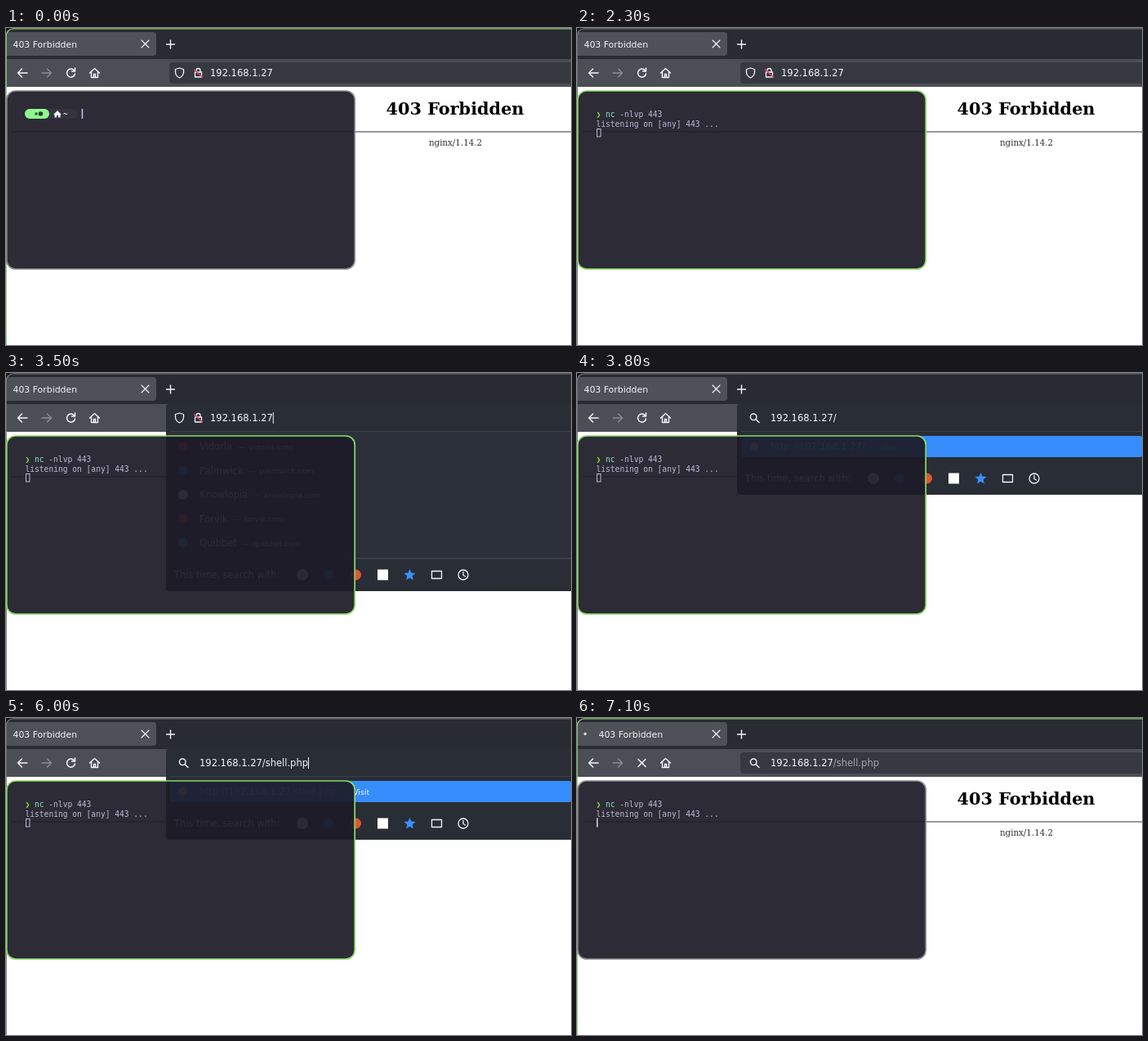
Recreate the animation shown at these times as an HTML page with a canvas. Size 692 px wide and 388 px high, loop 8000 ms.

```html
<!DOCTYPE html>
<html lang="en">
<head>
<meta charset="utf-8">
<title>Listener and browser</title>
<style>
  html, body { margin: 0; width: 100%; height: 100%; overflow: hidden; background: #fff; }
  canvas { display: block; }
</style>
</head>
<body>
<canvas id="stage" width="692" height="388"></canvas>
<script>
const ctx = document.getElementById('stage').getContext('2d');
const LOOP = 8000, TICK = 100;
const SANS = '"DejaVu Sans", sans-serif', SERIF = '"DejaVu Serif", serif', MONO = '"DejaVu Sans Mono", monospace';
const HOST = '192.168.1.27', PATH = '/shell.php', COMMAND = 'nc -nlvp 443', CHAR = 5.77;
const WHITE = '#f4f4f8', LAVENDER = '#c0b9d6', MINT = '#8fe6c4';

const ICON = {
  back: 'M6 0H-5.5M-.5-5L-5.5 0L-.5 5',
  forward: 'M-6 0H5.5M.5-5L5.5 0L.5 5',
  reload: 'M4-3A5 5 0 1 0 5 1M5-6V-2H1',
  cross: 'M-4.5-4.5L4.5 4.5M4.5-4.5L-4.5 4.5',
  home: 'M-6 0L0-5.5L6 0M-4-1.5V5.5H4V-1.5M-1 5V1.5H1V5',
  plus: 'M-5 0H5M0-5V5',
  shield: 'M0-6L5-4.5V-1C5 3 2 5 0 6C-2 5-5 3-5-1V-4.5Z',
  lock: 'M-4-1H4V5H-4ZM-2.5-1V-3A2.5 2.5 0 0 1 2.5-3V-1',
  slash: 'M-5-4L5 5',
  lens: 'M2.5-1.2A3.8 3.8 0 1 1-5.1-1.2A3.8 3.8 0 1 1 2.5-1.2M1.4 1.5L5.5 5.5',
  star: 'M0-7L2-2.4L7-2L3.2 1.4L4.4 6.4L0 3.7L-4.4 6.4L-3.2 1.4L-7-2L-2-2.4Z',
  tabs: 'M-6-4.5H6V4.5H-6Z',
  clock: 'M6 0A6 6 0 1 1-6 0A6 6 0 1 1 6 0M0-3.5V.5L2.5 2',
  house: 'M-5 .5L0-4.5L5 .5H3.5V4H1V1.5H-1V4H-3.5V.5Z'
};

const SITES = [
  ['Vidorla', '#e8334a'], ['Palmwick', '#3b7de0'], ['Knowlopia', '#ffffff'],
  ['Forvik', '#f2552c'], ['Quibbet', '#3ba7ee']
];

const clamp = v => Math.max(0, Math.min(1, v));
const mix = (a, b, k) => `rgb(${a.map((v, i) => Math.round(v + (b[i] - v) * k))})`;

function rect(x, y, w, h, color, r = 0) {
  ctx.fillStyle = color;
  ctx.beginPath();
  ctx.roundRect(x, y, w, h, r);
  ctx.fill();
}

const disc = (x, y, r, color) => rect(x - r, y - r, 2 * r, 2 * r, color, r);

// Draws text and returns the x where it ends.
function text(str, x, y, color, size, family = SANS, align = 'left') {
  ctx.font = `${size}px ${family}`;
  ctx.textAlign = align;
  ctx.fillStyle = color;
  ctx.fillText(str, x, y);
  return x + ctx.measureText(str).width;
}

function icon(name, x, y, color = WHITE, width = 1.4, filled = false) {
  const path = new Path2D(ICON[name]);
  ctx.save();
  ctx.translate(x, y);
  ctx.fillStyle = ctx.strokeStyle = color;
  ctx.lineWidth = width;
  ctx.lineCap = ctx.lineJoin = 'round';
  filled ? ctx.fill(path) : ctx.stroke(path);
  ctx.restore();
}

function page() {
  rect(0, 72, 692, 316, '#fff');
  text('403 Forbidden', 550, 106, '#000', 'bold 20.8', SERIF, 'center');
  rect(7, 126.3, 685, 1.5, '#777');
  text('nginx/1.14.2', 550.5, 144, '#333', 10.3, SERIF, 'center');
}

function browserBars(loading, dotX) {
  rect(0, 0, 692, 38, '#292b33');
  rect(0, 38, 692, 34, '#4c4e55');
  rect(-6, 5, 190, 29, '#4f5158', 4);
  if (loading) disc(dotX, 19.5, 1.8, '#d8d8dc');
  text('403 Forbidden', loading ? 26.5 : 8.5, 24, WHITE, 10.9);
  icon('cross', 170.5, 19.5, WHITE, 1.1);
  icon('plus', 201.5, 20, WHITE, 1.4);
  icon('back', 20, 55, WHITE, 1.5);
  icon('forward', 50, 55, '#8b8d93', 1.4);
  icon(loading ? 'cross' : 'reload', 79.5, 55, WHITE, 1.5);
  icon('home', 108.5, 55, WHITE, 1.4);
}

function suggestion(y, title, detail) {
  const end = text(title, 237, y + 4, WHITE, 11.5);
  text('—', end + 6, y + 3.5, WHITE, 9.3);
  text(detail, end + 20, y + 3.5, WHITE, 9.3);
}

function searchRow(y) {
  text('This time, search with:', 206, y + 4, WHITE, 11.4);
  disc(363, y, 7, '#e8e8ec');
  disc(395, y, 6, '#2d8fd0');
  disc(428.5, y, 6.5, '#de5833');
  rect(455, y - 6.5, 13, 13, '#fff');
  icon('star', 494.5, y, '#3a8fff', 1, true);
  icon('tabs', 527.5, y, WHITE, 1.3);
  icon('clock', 560, y, WHITE, 1.3);
}

function dropdown(typed) {
  rect(196, 38, 500, typed ? 111 : 229, '#292d36', 3);
  rect(201, 71, 491, 1, '#3c4049');
  if (typed) {
    rect(201, 77, 491, 26, '#368dfb', 2);
    disc(217, 90, 5.5, '#e8e8ec');
    suggestion(90, `http://${HOST}${typed}`, 'Visit');
    searchRow(129);
  } else {
    rect(196, 72, 496, 154, '#2c303a');
    SITES.forEach(([name, color], i) => {
      const y = 90 + i * 29.5;
      disc(217, y, 6, color);
      suggestion(y, name, name.toLowerCase() + '.com');
    });
    rect(201, 226.5, 491, 1, '#4b4f58');
    searchRow(247);
  }
}

function addressBar(t) {
  const open = t >= 2800 && t < 6200;
  const count = t < 3800 ? 0 : t < 4000 ? 1 : t < 4500 ? 2 : t < 5000 ? 4 : t < 5200 ? 6 : t < 5300 ? 8 : 10;
  const typed = PATH.slice(0, count);
  if (open) dropdown(typed);
  else rect(200, 42, 500, 26, '#36393f', 4);

  if (typed) {
    icon('lens', 217.5, 55, WHITE, 1.4);
  } else {
    icon('shield', 212.5, 55, WHITE, 1.3);
    icon('lock', 235.5, 55, WHITE, 1.3);
    icon('slash', 235.5, 55, '#e2426a', 1.5);
  }
  const hostEnd = text(HOST, typed ? 237 : 250, 59, WHITE, 11.5);
  const end = text(typed, hostEnd, 59, open ? WHITE : '#a5a6ab', 11.5);
  if (open && (t < 3800 || t >= 5300)) rect(end, 48, 1, 14, WHITE);
}

function prompt(t) {
  rect(40, 99, 48, 12, '#33343e', 6);
  rect(23, 99, 30, 12, '#8ff78f', 6);
  disc(37, 105, 1.8, '#2f5a35');
  disc(42.5, 105, 2.8, '#22442a');
  icon('house', 63, 105.5, WHITE, 1, true);
  text('~', 70, 108.5, WHITE, 9.6, MONO);

  const x = 92, y = 109;
  const typed = t < 500 ? '' : t < 800 ? 'n' : t < 1100 ? 'nc' : COMMAND;
  if (t >= 900 && t < 1100) text(COMMAND.slice(2), x + 2 * CHAR, y, '#6d6b7d', 9.6, MONO);
  text(typed.slice(0, 2), x, y, typed === 'n' ? '#f0708a' : MINT, 9.6, MONO);
  text(typed.slice(2), x + 2 * CHAR, y, LAVENDER, 9.6, MONO);
  rect(x + typed.length * CHAR + .7, 99, 1.5, 12, '#c3ccff');
}

function terminal(t, away) {
  ctx.beginPath();
  ctx.roundRect(.8, 77, 426.4, 218, 11);
  ctx.fillStyle = 'rgba(28, 27, 39, .93)';
  ctx.fill();
  ctx.strokeStyle = mix([138, 138, 143], [139, 219, 103], away);
  ctx.lineWidth = 1.7;
  ctx.stroke();

  if (t < 1400) return prompt(t);
  text('❯', 23.5, 109, '#8ee63c', 9.6, MONO);
  text('nc', 35, 109, MINT, 9.6, MONO);
  text(COMMAND.slice(2), 35 + 2 * CHAR, 109, LAVENDER, 9.6, MONO);
  text('listening on [any] 443 ...', 23.5, 121, LAVENDER, 9.6, MONO);
  if (away > .5) {
    ctx.strokeStyle = LAVENDER;
    ctx.lineWidth = 1;
    ctx.strokeRect(24.5, 123.5, 4.5, 9.5);
  } else {
    rect(24, 122.5, 1.5, 11, '#d5d7f4');
  }
}

function draw(t) {
  const away = Math.min(clamp((t - 2100) / 200), clamp((6400 - t) / 300));
  rect(0, 0, 692, 388, '#17181d');
  ctx.save();
  ctx.beginPath();
  ctx.roundRect(0, .5, 720, 420, 9);
  ctx.clip();
  page();
  browserBars(t >= 6200, t < 7100 ? 20 : 10);
  ctx.restore();

  ctx.beginPath();
  ctx.roundRect(.2, .8, 720, 420, 9);
  ctx.strokeStyle = mix([142, 208, 122], [112, 113, 120], away);
  ctx.lineWidth = 1.3;
  ctx.stroke();

  addressBar(t);
  terminal(t, away);
}

function frame() {
  const t = performance.now() % LOOP;
  draw(Math.floor(t / TICK) * TICK);
  requestAnimationFrame(frame);
}
frame();
</script>
</body>
</html>
```
